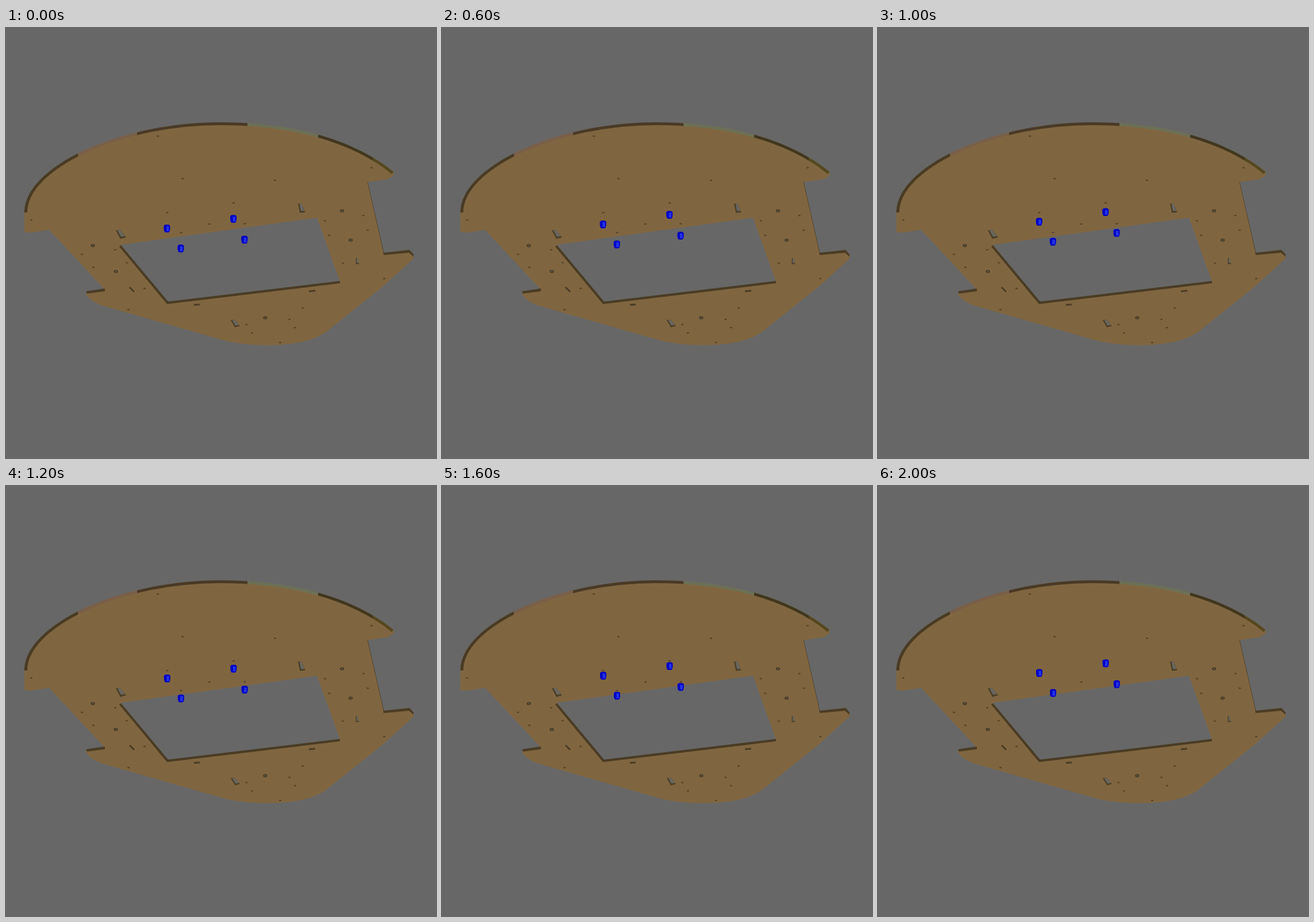
These frames come from a looping animation (748x748 px, 4.2 s). An HTML page:

```html
<!DOCTYPE html>
<html lang="en">
<head>
<meta charset="utf-8">
<title>Plate with rising pins</title>
<style>
  html, body { margin: 0; width: 100%; height: 100%; overflow: hidden; background: #676767; }
  svg { display: block; width: 748px; height: 748px; }
</style>
</head>
<body>
<svg viewBox="0 0 748 748">
  <defs>
    <linearGradient id="rimColors" gradientUnits="userSpaceOnUse" x1="0" x2="748" y1="0" y2="0"></linearGradient>
    <path id="plate" d="M32 355V321C32 240 200 164 372 164C490 164 600 190 674 250V257L664 263L629 268L657 391L700 386L710 396L708 402L655 450L560 526Q544 539 515 546Q450 558 385 545L210 495L168 483Q143 474 139 461L172 455L75 351L44 356Z"/>
    <clipPath id="inside"><use href="#plate"/></clipPath>
    <g id="pin">
      <path d="M-5.5-5L-3-7H3L5.5-5V1L4.5 5L3 6.5H-3L-4.5 5L-5.5 1Z" fill="#0000c4"/>
      <path d="M-1-4H3.5V4.5H-1Z" fill="#2333e8"/>
    </g>
    <g id="slot">
      <path d="M-9-7L-2-8L9 5L-1 8Z" fill="#4c3f26"/>
      <path d="M-6-7L-2-8L7 3L0 4Z" fill="#686660"/>
    </g>
    <g id="boss">
      <ellipse rx="3.7" ry="2.7" fill="#463c26"/>
      <ellipse rx="1.5" ry="1.2" fill="#625b48"/>
    </g>
    <ellipse id="hole" rx="2.2" ry="1.2" fill="#52442b"/>
  </defs>

  <use href="#plate" fill="#806640"/>
  <path clip-path="url(#inside)" fill="none" stroke="url(#rimColors)" stroke-width="10"
    d="M32 321C32 240 200 164 372 164C490 164 600 190 674 250"/>

  <!-- Notch walls -->
  <path fill="#4b3c24" d="M139 458L172 453V458L141 462ZM656 391L702 386L709 394V398L701 391L657 395Z"/>
  <path d="M629 268L657 391" stroke="#544630"/>

  <!-- Central opening -->
  <path fill="#676767" d="M200 377L541 330L581 441L281 478Z"/>
  <path d="M198.5 379L281 478L581 442" fill="none" stroke="#4a3c24" stroke-width="4.2"/>

  <g id="details"></g>
  <g id="pins"></g>
</svg>
<script>
const byId = id => document.getElementById(id);
const place = (shape, x, y, extra = '') =>
  `<use href="#${shape}" transform="translate(${x} ${y}) ${extra}"/>`;
const SIDES = [-1, 1];

// Four holes on a skewed grid, with bosses above and below its centre.
function mount(x, y, [ux, uy], [vx, vy], bossSides = SIDES) {
  const holes = SIDES.flatMap(i => SIDES.map(j =>
    place('hole', x + (i * ux + j * vx) / 2, y + (i * uy + j * vy) / 2)));
  const bosses = bossSides.map(j => place('boss', x + j * vx, y + j * vy));
  return [...holes, ...bosses].join('');
}

let start = 0;
byId('rimColors').innerHTML = [
  [125, '#493b24'], [228, '#795f49'], [420, '#493a26'], [543, '#6c7056'], [638, '#41371e'], [748, '#55481f']
].map(([end, color]) => {
  const stops = [start, end].map(x => `<stop offset="${x / 748}" stop-color="${color}"/>`);
  start = end;
  return stops.join('');
}).join('');

// Perspective grid shared by the pins and their sockets.
const pins = [0, 1].flatMap(i => [0, 1].map(j => [
  280 + 115.5 * i + 24 * j - 4.7 * i * j,
  349 - 16.8 * i + 34.8 * j + 1.5 * i * j
]));
const loose = [[44, 334], [264, 188], [636, 243], [307, 262], [468, 265],
  [354, 341], [586, 409], [658, 436], [241, 453], [213, 490], [516, 487], [477, 547]];

byId('details').innerHTML =
  mount(171, 401, [58, -8], [20, 22.5]) +
  mount(592, 343.5, [67, -9], [7.5, 25.5]) +
  mount(460.5, 518.5, [75, -9], [9.5, 14.5], [-1]) +
  place('slot', 200, 359) +
  place('slot', 514, 314, 'rotate(14) scale(.9 1)') +
  place('slot', 399, 514, 'scale(.9 .85)') +
  place('slot', 611, 406, 'rotate(22) scale(.5 .65)') +
  [...pins.map(([x, y]) => [x + .5, y - 28]), ...loose].map(p => place('hole', ...p)).join('') +
  '<path stroke="#493c26" stroke-width="3" d="M215 451L223 459M327 481.5L337 481M527 458L538 457"/>';

byId('pins').innerHTML = pins.map(p => place('pin', ...p)).join('');

const LOOP = 4200, STEP = 200, STEPS = 10, RISE = 23.5;
function draw() {
  const step = Math.min(STEPS, Math.floor(performance.now() % LOOP / STEP));
  const progress = step / STEPS;
  byId('pins').setAttribute('transform', `translate(${progress * .5} ${-RISE * progress})`);
  requestAnimationFrame(draw);
}
draw();
</script>
</body>
</html>
```
